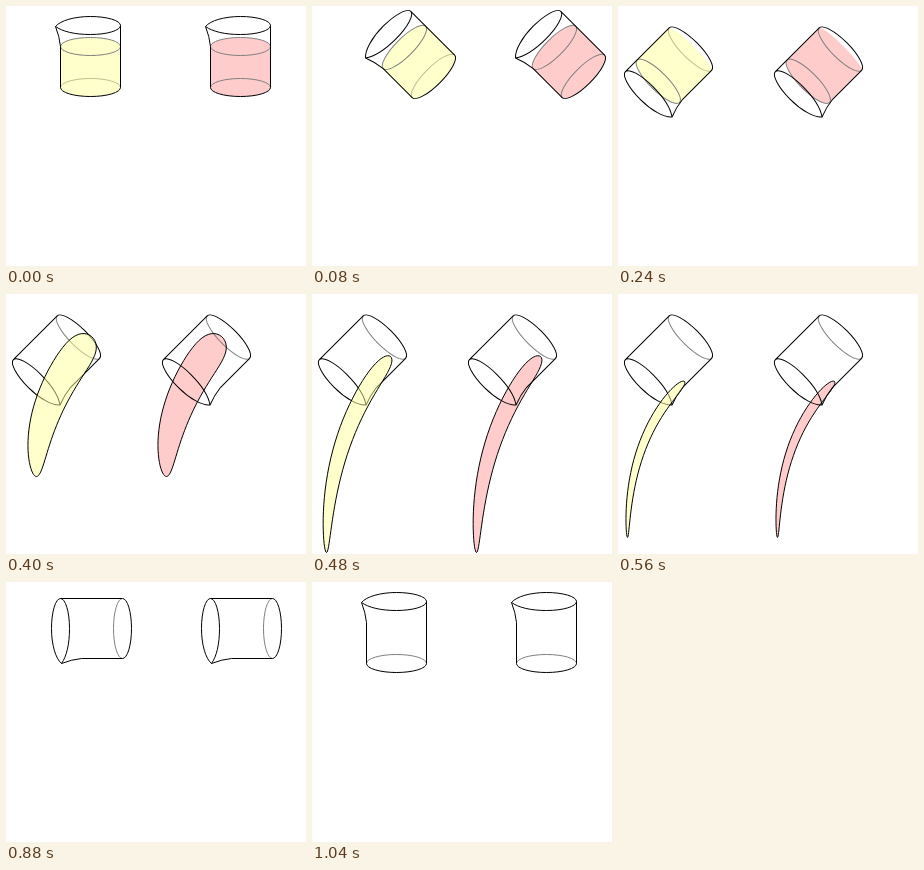
Animation of 300x260 px, one loop 1.12 s. Source, as an HTML page with a canvas:

```html
<!DOCTYPE html>
<html lang="en">
<head>
<meta charset="utf-8">
<title>Pouring beakers</title>
<style>
html, body { margin: 0; width: 100%; height: 100%; overflow: hidden; background: #fff; }
canvas { display: block; }
</style>
</head>
<body>
<canvas id="stage" width="300" height="260"></canvas>
<script>
const ctx = document.getElementById('stage').getContext('2d');
const STEP = 80, GAP = 150;
const RX = 30, RY = 9, RIM = -31, BASE = 31;
const GRAY = '#808080';

// Beaker poses: centre and turn in eighths of a circle
const upright = { x: 84.5, y: 50.5, turn: 0 };
const leaning = { x: 99.5, y: 48.5, turn: -1 };
const lying = { x: 85.5, y: 46.5, turn: -2 };
const tipped = { x: 50.5, y: 65, turn: -3 };

// A stream runs along a curve from head to foot, bent towards a third point
const stream = (head, bend, foot, wide) => ({ head, bend, foot, wide });

const steps = [
  { pose: upright, level: -10 },
  { pose: leaning, level: -10 },
  { pose: lying, level: -10 },
  { pose: tipped, level: -14.5, bulge: 4 },
  { pose: tipped, flow: stream([82, 40], [46, 80], [38, 134], 20) },
  { pose: tipped, flow: stream([85, 42], [28, 110], [30, 182], 17), shift: -20 },
  { pose: tipped, flow: stream([78, 62], [14, 140], [14, 258], 9) },
  { pose: tipped, flow: stream([66, 87], [9, 142], [9, 243], 4.8) },
  { pose: tipped, flow: stream([21, 165], [9, 200], [9, 243], 4.8) },
  { pose: tipped },
  { pose: tipped },
  { pose: lying },
  { pose: leaning },
  { pose: upright }
];

const beakers = [
  { x: 0, fill: 'rgba(255,255,153,.5)', veil: true },
  { x: GAP, fill: '#ffcccc', veil: false }
];

function stroke(color, trace) {
  ctx.beginPath();
  trace();
  ctx.strokeStyle = color;
  ctx.stroke();
}

function fill(color, trace) {
  ctx.beginPath();
  trace();
  ctx.fillStyle = color;
  ctx.fill();
}

function inPose(pose, dx, draw) {
  ctx.save();
  ctx.translate(pose.x + dx, pose.y);
  ctx.rotate(pose.turn * Math.PI / 4);
  draw();
  ctx.restore();
}

function backArc() {
  stroke(GRAY, () => ctx.ellipse(0, BASE, RX, RY, 0, Math.PI, 2 * Math.PI));
}

function glass() {
  stroke('#000', () => {
    ctx.moveTo(-35, -30);
    ctx.bezierCurveTo(-30, -36, -16, -40, 0, -40);
    ctx.ellipse(0, RIM, RX, RY, 0, -Math.PI / 2, Math.PI / 2);
    ctx.bezierCurveTo(-16, -22, -28, -25, -35, -30);
    ctx.quadraticCurveTo(-31, -20, -RX, -10);
    ctx.lineTo(-RX, BASE);
    ctx.ellipse(0, BASE, RX, RY, 0, Math.PI, 0, true);
    ctx.lineTo(RX, RIM);
  });
}

function contents(color, level, bulge = RY) {
  fill(color, () => {
    ctx.ellipse(0, level, RX, RY, 0, Math.PI, 2 * Math.PI);
    ctx.ellipse(0, BASE, RX, bulge, 0, 0, Math.PI);
    ctx.closePath();
  });
}

function surface(level) {
  stroke(GRAY, () => ctx.ellipse(0, level, RX, RY, 0, 0, 2 * Math.PI));
}

// Point on one edge of a stream: blunt at the head, tapering to the foot
function edge({ head, bend, foot, wide }, u, side) {
  const v = 1 - u;
  const [x, y] = [0, 1].map(i => v * v * head[i] + 2 * u * v * bend[i] + u * u * foot[i]);
  const [tx, ty] = [0, 1].map(i => v * (bend[i] - head[i]) + u * (foot[i] - bend[i]));
  const w = side * wide * Math.sqrt((1 - u * u) * (1 - v ** 16)) / Math.hypot(tx, ty);
  return [x + ty * w, y - tx * w];
}

function traceFlow(flow, dx) {
  const n = 40;
  for (let k = 0; k < 2 * n; k++) {
    const a = k * Math.PI / n;
    const [x, y] = edge(flow, (1 - Math.cos(a)) / 2, k < n ? 1 : -1);
    ctx.lineTo(x + dx + .5, y + .5);
  }
  ctx.closePath();
}

function drawBeaker({ pose, level, bulge, flow, shift = 0 }, { x, fill: color, veil }) {
  const full = level !== undefined;
  const place = draw => inPose(pose, x, draw);
  const outline = () => traceFlow(flow, x ? x + shift : 0);
  const liquid = () => {
    if (full) place(() => contents(color, level, bulge));
    if (flow) fill(color, outline);
  };

  if (!veil) liquid();
  place(backArc);
  if (flow) place(glass);
  if (veil) liquid();
  if (full) place(() => surface(level));
  if (!flow) place(glass);
  if (flow) stroke('#000', outline);
}

const start = performance.now();

function frame() {
  const t = performance.now() - start;
  const step = steps[Math.floor(t / STEP) % steps.length];
  ctx.fillStyle = '#fff';
  ctx.fillRect(0, 0, 300, 260);
  ctx.lineWidth = 1;
  ctx.lineJoin = 'round';
  beakers.forEach(b => drawBeaker(step, b));
  requestAnimationFrame(frame);
}
frame();
</script>
</body>
</html>
```
